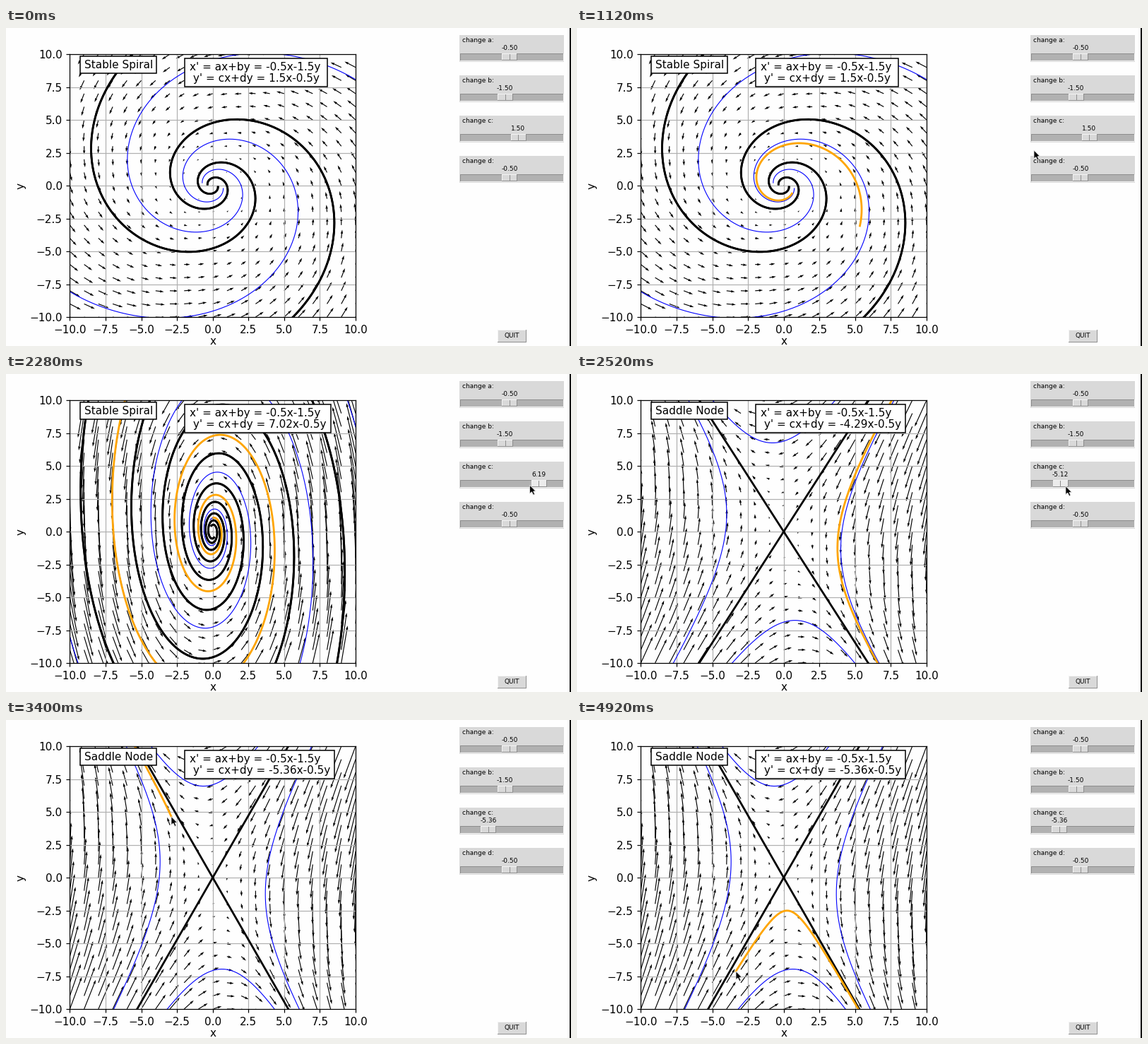
A matplotlib script that plays this animation: 800 px wide and 450 px high, repeating every 5000 ms.

```python
from itertools import product

import numpy as np
import matplotlib.pyplot as plt
from matplotlib.animation import FuncAnimation
from matplotlib.patches import Polygon, Rectangle

plt.rcParams["font.family"] = "DejaVu Sans"

W, H = 800, 450
LEFT, RIGHT, TOP, BOTTOM = 90.4, 495.0, 37.1, 409.0
A, B, D = -0.5, -1.5, -0.5
PAPER, PANEL, TROUGH = "#fefefe", "#d9d9d9", "#b1b1b1"
LIGHT, DARK = "#f4f4f4", "#8c8c8c"
FONT, SMALL = 11, 6.5

# Dragging c: (step, value)
DRAG = [(19, 1.5), (31, 7.02), (33, 7.02), (34, 6.19), (37, -4.29),
        (38, -5.12), (39, -5.36)]

# Pointer stops outside the drag: (step, x, y)
STOPS = [(0, -224, 298), (13, 400.5, 280), (14, 400.5, 280), (17, 647, 173),
         (19, 734, 152), (42, 690, 160), (49, 234, 136.5), (52, 234, 136.5),
         (58, 121, 362), (60, 155, 340), (62, 187, 346), (67, 225, 355.5)]
CLICKS = (13, 50, 58, 60, 68)


def follow(points, step):
    """Linear path through (step, value...) points."""
    steps, *columns = zip(*points)
    return np.array([np.interp(step, steps, col) for col in columns])


def slider_c(step):
    return round(float(follow(DRAG, step)[0]), 2)


def plot_c(step):
    """The plot follows the slider one step late."""
    return slider_c(step - 1)


def dragging(step):
    return DRAG[0][0] <= step <= DRAG[-1][0]


def knob_x(value):
    return 716 + 6.17 * value


def pointer_at(step):
    x, y = follow(STOPS, step)
    if dragging(step):
        x = knob_x(slider_c(step + 1)) + 9
    return x, y


def to_data(x, y):
    return np.array([-10 + 20 * (x - LEFT) / (RIGHT - LEFT),
                     10 - 20 * (y - TOP) / (BOTTOM - TOP)])


def eigen(c):
    root = np.sqrt(complex(B * (c or 1e-3)))
    lam = A + root * np.array([1, -1])
    vecs = np.array([[B, B], [root, -root]])
    for i in range(2):
        v = vecs[:, i]
        lead = v[0] if c <= 0 else v[np.argmax(abs(v))]
        vecs[:, i] = v / (lead / abs(lead)) / np.linalg.norm(v)
    return lam, vecs


def solution(c, coef, start=-4):
    lam, vecs = eigen(c)
    t = np.linspace(start, 4, 900)
    modes = np.asarray(coef)[:, None] * np.exp(np.outer(lam, t))
    return (vecs @ modes).real


def kind(c):
    if A * D - B * c < 0:
        return "Saddle Node"
    return "Stable Spiral" if B * c < 0 else "Stable Node"


fig = plt.figure(figsize=(W / 100, H / 100), dpi=100, facecolor=PAPER)

# Phase plane
ax = fig.add_axes([LEFT / W, 1 - BOTTOM / H, (RIGHT - LEFT) / W, (BOTTOM - TOP) / H],
                  facecolor=PAPER)
ax.set(xlim=(-10, 10), ylim=(-10, 10))
ticks = np.arange(-10, 10.1, 2.5)
ax.set_xticks(ticks)
ax.set_yticks(ticks)
ax.tick_params(labelsize=FONT, length=3.85, pad=3.85, width=0.88)
ax.grid(True, lw=0.88, color="#b0b0b0")
for spine in ax.spines.values():
    spine.set_linewidth(0.88)

gx, gy = np.meshgrid(np.arange(-10, 11), np.arange(-10, 11))


def field(c):
    return A * gx + B * gy, c * gx + D * gy


# Arrow scale stays as it suits the first system
mean_speed = np.hypot(*field(1.5)).mean()
arrows = ax.quiver(gx, gy, *field(1.5), angles="xy", scale_units="xy",
                   scale=1.8 * mean_speed * 21 / 20)
BLUE = list(product((4, -4), repeat=2))
BLACK = [*(4 * np.eye(2)), *(-4 * np.eye(2))]
blue = [ax.plot([], [], color="blue", lw=0.8)[0] for _ in BLUE]
black = [ax.plot([], [], color="black", lw=2)[0] for _ in BLACK]
orbit, = ax.plot([], [], color="orange", lw=2)

# Overlay in pixels
ui = fig.add_axes([0, 0, 1, 1])
ui.set(xlim=(0, W), ylim=(H, 0))
ui.axis("off")


def box(x0, y0, x1, y1, **style):
    return ui.add_patch(Rectangle((x0, y0), x1 - x0, y1 - y0, **style))


def label(x, y, text, size=FONT, **style):
    return ui.text(x, y, text, fontsize=size, va="baseline", **style)


class Bevel:
    """Rectangle with one tone above and left, another below and right."""

    def __init__(self, x0, y0, x1, y1, fill, upper, lower):
        self.y0, self.y1 = y0, y1
        self.body = box(x0, y0, x1, y1, fc=fill, ec="none", zorder=2)
        self.upper, = ui.plot([], [], color=upper, lw=0.7)
        self.lower, = ui.plot([], [], color=lower, lw=0.7)
        self.move(x0, x1)

    def move(self, x0, x1):
        y0, y1 = self.y0, self.y1
        self.body.set_x(x0)
        self.upper.set_data([x0, x0, x1], [y1, y0, y0])
        self.lower.set_data([x0, x1, x1], [y1, y1, y0])


class Slider:
    def __init__(self, name, y, value):
        box(642, y, 790, y + 37.5, fc=PANEL, ec="none")
        label(646.5, y + 10.3, f"change {name}:", SMALL)
        Bevel(643, y + 25.5, 789, y + 35.5, TROUGH, DARK, LIGHT)
        self.text = label(0, y + 21.3, "", SMALL, ha="center")
        self.knob = Bevel(0, y + 25.5, 21, y + 35, PANEL, LIGHT, DARK)
        self.notch, = ui.plot([0, 0], [y + 26.5, y + 34], color=DARK, lw=0.7)
        self.set(value)

    def set(self, value, active=False):
        x = knob_x(value)
        self.text.set(x=x, text=f"{value:.2f}")
        self.knob.move(x - 10.5, x + 10.5)
        self.knob.body.set_facecolor("#ececec" if active else PANEL)
        self.notch.set_xdata([x, x])


label(292.7, 448, "x", ha="center")
ui.text(21, 223.4, "y", fontsize=FONT, rotation=90, ha="center", va="center")

box(104.5, 40, 213, 64, fc="white", ec="black", lw=1.1)
title = label(111.2, 56.8, "")
frame = box(252.5, 43, 456, 83, fc="white", ec="black", lw=1.1)
label(259.6, 60.2, "x' = ax+by = -0.5x-1.5y")
equation = label(259.6, 76, "")

sliders = [Slider(name, 10 + 57 * i, value)
           for i, (name, value) in enumerate(zip("abcd", (A, B, 1.5, D)))]

Bevel(695.5, 426.5, 735.5, 443.5, PANEL, LIGHT, DARK)
label(715.8, 438.2, "QUIT", SMALL, ha="center")
box(798, 0, 800, H, fc="black", ec="none")

ARROW = np.array([(0, 0), (0, 12), (2.8, 9.5), (5, 14), (7, 13), (5, 8.8), (8.5, 8.6)])
pointer = ui.add_patch(Polygon(ARROW, fc="black", ec="#e4e4e4", lw=0.6, zorder=5))


def draw_system(c):
    arrows.set_UVC(*field(c))
    for line, coef in zip(blue + black, BLUE + BLACK):
        line.set_data(*solution(c, coef))
    title.set_text(kind(c))
    equation.set_text(f" y' = cx+dy = {c:g}x-0.5y")
    right = equation.get_window_extent().x1
    frame.set_width(max(right, 449) + 6.4 - frame.get_x())


def draw_orbit(step, c):
    past = [click for click in CLICKS if click <= step]
    if not past:
        orbit.set_data([], [])
        return
    start_c = plot_c(past[-1])
    coef = np.linalg.solve(eigen(start_c)[1], to_data(*pointer_at(past[-1])))
    # A fresh click shows only its future, a changed system also the past
    orbit.set_data(*solution(c, coef, 0 if c == start_c else -2))


def update(tick):
    # Three steps every 200 ms, on a 40 ms clock
    step = 3 * (tick // 5) + (tick % 5 + 1) // 2 - (tick % 5 == 1)
    c = plot_c(step)
    draw_system(c)
    draw_orbit(step, c)
    sliders[2].set(slider_c(step), dragging(step))
    pointer.set_xy(ARROW + pointer_at(step))


anim = FuncAnimation(fig, update, frames=125, interval=40, repeat=True,
                     repeat_delay=0, init_func=lambda: None)
plt.show()
```
